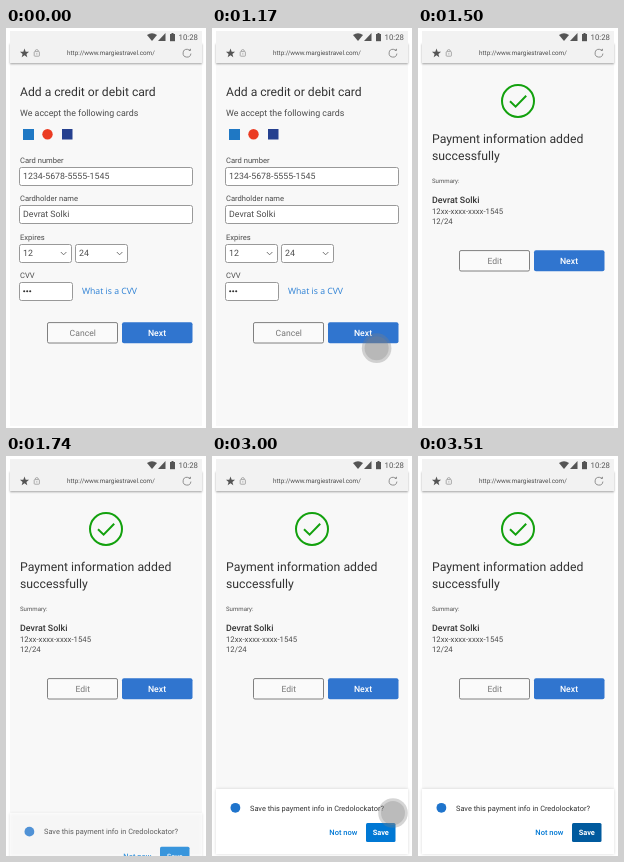
An HTML page with a canvas that plays this animation: 200x400 px, repeating every 4.05 s.

```html
<!DOCTYPE html>
<html lang="en">
<head>
<meta charset="utf-8">
<title>Add a card</title>
<style>
html, body { margin: 0; width: 100%; height: 100%; overflow: hidden; background: #fff; }
canvas { display: block; width: 200px; height: 400px; }
</style>
</head>
<body>
<canvas id="stage"></canvas>
<script>
const LOOP = 4050, STEP = 30;
const NAME = 'Devrat Solki';
const BLUE = '#3075cf', ACCENT = '#0078d4', PRESSED = '#005a9e';
const INK = '#333', SOFT = '#4c4c4c';

const canvas = document.getElementById('stage');
const ctx = canvas.getContext('2d');
const dpr = window.devicePixelRatio || 1;
canvas.width = 200 * dpr;
canvas.height = 400 * dpr;
ctx.scale(dpr, dpr);
ctx.textRendering = 'geometricPrecision';

// Text is placed by the middle of its capitals.
function text(str, x, mid, size, o = {}) {
  ctx.font = `${o.weight || 400} ${size}px ${o.font || 'Roboto'}, sans-serif`;
  ctx.textAlign = o.center ? 'center' : 'left';
  ctx.fillStyle = o.color || INK;
  ctx.fillText(str, x, mid + size * 0.355);
}

function rect(x, y, w, h, color) {
  ctx.fillStyle = color;
  ctx.fillRect(x, y, w, h);
}

function box(x, y, w, h, r, fill, stroke, width = 1) {
  ctx.beginPath();
  ctx.roundRect(x, y, w, h, r);
  if (fill) { ctx.fillStyle = fill; ctx.fill(); }
  if (stroke) { ctx.strokeStyle = stroke; ctx.lineWidth = width; ctx.stroke(); }
}

function dot(x, y, r, color) {
  ctx.beginPath();
  ctx.arc(x, y, r, 0, Math.PI * 2);
  ctx.fillStyle = color;
  ctx.fill();
}

function path(points, { fill, stroke, width = 1 }) {
  ctx.beginPath();
  points.forEach(([x, y], i) => i ? ctx.lineTo(x, y) : ctx.moveTo(x, y));
  if (fill) { ctx.closePath(); ctx.fillStyle = fill; ctx.fill(); }
  if (stroke) { ctx.strokeStyle = stroke; ctx.lineWidth = width; ctx.stroke(); }
}

function arc(x, y, r, from, to, color, width) {
  ctx.beginPath();
  ctx.arc(x, y, r, from, to);
  ctx.strokeStyle = color;
  ctx.lineWidth = width;
  ctx.stroke();
}

function statusBar() {
  const grey = '#555';
  ctx.beginPath();
  ctx.moveTo(146, 13);
  ctx.lineTo(141, 7);
  ctx.quadraticCurveTo(146, 3.6, 151, 7);
  ctx.closePath();
  ctx.fillStyle = grey;
  ctx.fill();
  path([[152, 13], [159.5, 13], [159.5, 5]], { fill: grey });
  rect(164, 6, 5, 7.2, grey);
  rect(165.5, 5, 2, 1, grey);
  text('10:28', 172.5, 9.4, 7.8, { color: '#555' });
}

function addressBar() {
  const star = [];
  for (let i = 0; i < 10; i++) {
    const a = i * Math.PI / 5 - Math.PI / 2, r = i % 2 ? 2 : 4.8;
    star.push([18.5 + r * Math.cos(a), 25.3 + r * Math.sin(a)]);
  }
  path(star, { fill: '#555' });
  box(28.2, 23.6, 5.2, 4.6, 0.6, null, '#999', 0.8);
  arc(30.8, 23.2, 1.6, Math.PI, 0, '#999', 0.8);
  rect(30.4, 25.3, 0.9, 1.2, '#999');
  text('http://www.margiestravel.com/', 61, 25, 6.33, { color: SOFT });
  arc(181, 25.2, 3.9, 0.1, Math.PI * 1.75, '#777', 0.8);
  path([[182.4, 22.8], [184.8, 22.8], [184.8, 20.4]], { fill: '#777' });
}

function chrome() {
  rect(0, 0, 200, 400, '#fff');
  rect(4, 35, 192, 363, '#f8f8f8');
  ctx.save();
  ctx.shadowColor = 'rgba(0,0,0,.35)';
  ctx.shadowBlur = 2 * dpr;
  ctx.shadowOffsetY = 0.7 * dpr;
  rect(4, 15, 192, 20, '#f2f2f2');
  ctx.restore();
  rect(4, 3, 192, 32, '#f2f2f2');
  statusBar();
  addressBar();
}

function buttons(y, label, nextColor) {
  box(41.5, y + 0.6, 70, 20.4, 1.5, '#fafafa', '#808080');
  text(label, 76.7, y + 10.8, 8.6, { center: true, color: '#777' });
  box(116, y + 0.3, 70.5, 21, 2, nextColor);
  text('Next', 151, y + 10.8, 8.7, { center: true, weight: 500, color: '#fff' });
}

function field(x, y, w, value) {
  box(x + 0.5, y + 0.5, w - 1, 18, 2, '#fff', '#999');
  if (value) text(value, x + 4, y + 9.2, 8.8, { color: SOFT });
}

function select(x, y, value) {
  field(x, y, 53, value);
  path([[x + 41.8, y + 8], [x + 44.6, y + 10.8], [x + 47.4, y + 8]], { stroke: '#666', width: 0.9 });
}

function formPage(nextColor) {
  text('Add a credit or debit card', 14, 63.5, 12.15);
  text('We accept the following cards', 14, 84.5, 8.85, { color: SOFT });
  rect(17, 101, 11, 11, '#1f78c4');
  dot(41.5, 106.2, 5.2, '#eb3b22');
  rect(56, 101, 10.5, 10.5, '#25408f');

  const label = (str, mid) => text(str, 14, mid, 7.6, { color: SOFT });
  label('Card number', 132.5);
  field(13, 139, 174, '1234-5678-5555-1545');
  label('Cardholder name', 170.5);
  field(13, 177, 174, NAME);
  label('Expires', 209);
  select(13, 216, '12');
  select(69, 216, '24');
  label('CVV', 247.3);
  field(13, 254, 54);
  for (let i = 0; i < 3; i++) dot(18.2 + i * 3, 263.2, 1.05, INK);
  text('What is a CVV', 76, 263, 8.7, { font: '"Open Sans"', color: '#2a7fd4' });
  buttons(294, 'Cancel', nextColor);
}

function donePage() {
  arc(100, 73, 16, 0, Math.PI * 2, '#13a10e', 2);
  path([[92, 73.2], [97.6, 78.6], [108.2, 67.8]], { stroke: '#13a10e', width: 2 });
  text('Payment information added', 14, 111, 12.25);
  text('successfully', 14, 128, 12.25);
  text('Summary:', 14, 153.3, 6.1, { color: '#555' });
  text(NAME, 14, 172, 8.9, { weight: 500 });
  text('12xx-xxxx-xxxx-1545', 14, 183, 7.75, { color: SOFT });
  text('12/24', 14, 193.5, 7.75, { color: SOFT });
  buttons(222, 'Edit', BLUE);
}

function sheet(t) {
  const p = Math.min(1, (t - 1650) / 210);
  ctx.save();
  ctx.globalAlpha = Math.min(1, p * 1.8);
  ctx.translate(0, 73 * (1 - p) ** 2);
  ctx.shadowColor = 'rgba(0,0,0,.16)';
  ctx.shadowBlur = 3 * dpr;
  rect(4, 333, 192, 65, '#fff');
  ctx.shadowColor = 'transparent';
  dot(23.4, 351.8, 4.9, '#1f74cc');
  text('Save this payment info in Credolockator?', 38, 352, 7.4);
  text('Not now', 117.3, 376.7, 7.5, { weight: 500, color: ACCENT });
  box(154, 367, 29.5, 19, 1.5, t >= 3510 ? PRESSED : ACCENT);
  text('Save', 168.8, 376.6, 7.4, { center: true, weight: 700, color: '#fff' });
  ctx.restore();
}

// Finger mark gliding from one point to another.
function touch(t, start, x0, y0, x1, y1) {
  const p = (t - start) / 510;
  if (p < 0 || p >= 1) return;
  const e = (1 - Math.cos(Math.PI * p)) / 2;
  const x = x0 + (x1 - x0) * e, y = y0 + (y1 - y0) * e;
  dot(x, y, 14.8, 'rgba(128,128,128,.33)');
  dot(x, y, 12, 'rgba(128,128,128,.3)');
}

function draw(t) {
  chrome();
  if (t < 1500) formPage(t >= 1410 ? PRESSED : BLUE);
  else donePage();
  if (t >= 1680) sheet(t);
  touch(t, 900, 181, 336, 151, 307);
  touch(t, 3000, 181, 357, 168, 378);
}

function tick() {
  const t = performance.now() % LOOP;
  draw(Math.floor(t / STEP) * STEP);
  requestAnimationFrame(tick);
}
tick();
</script>
</body>
</html>
```
